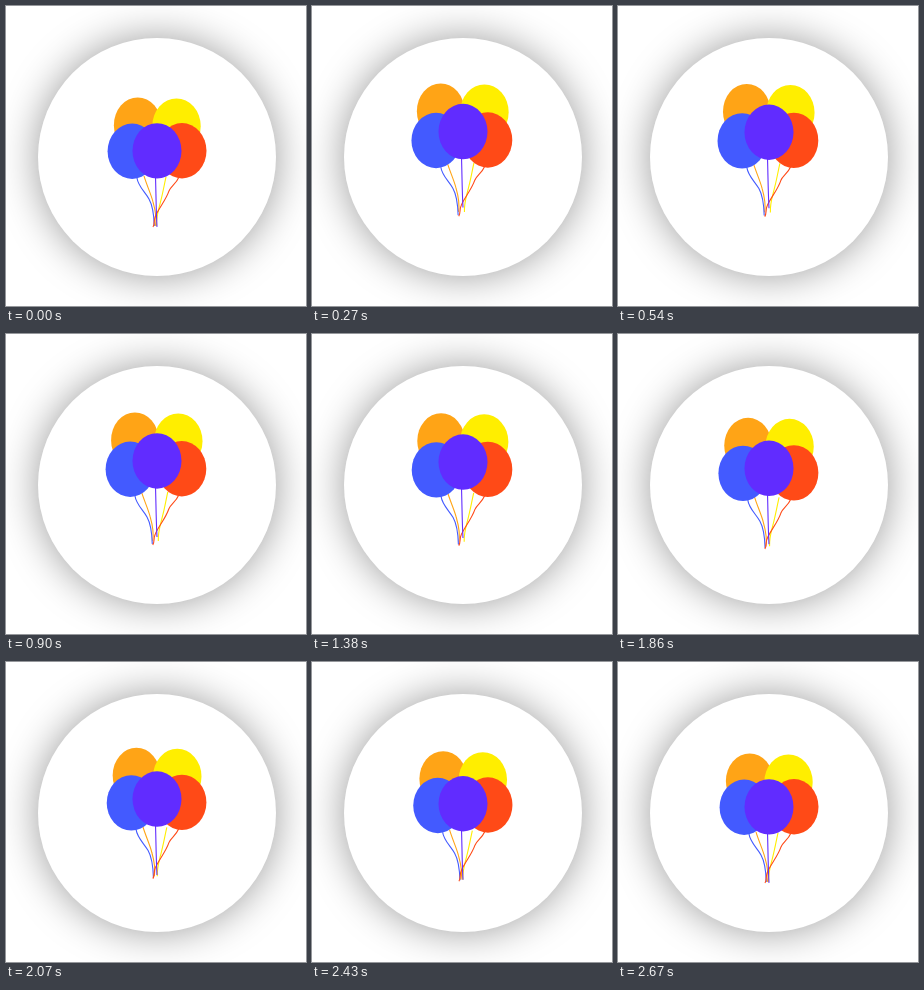
An HTML page that plays this animation: 300 by 300 pixels, repeating every 2.7 s.

```html
<!DOCTYPE html>
<html lang="en">
<head>
<meta charset="utf-8">
<title>Balloons</title>
<style>
  html, body { margin: 0; width: 100%; height: 100%; overflow: hidden; background: #fff; }
  .disc {
    position: absolute; left: 32px; top: 32px; width: 238px; height: 238px;
    border-radius: 50%; background: #fff; box-shadow: 0 0 40px rgba(0, 0, 0, .4);
  }
  svg { position: absolute; left: 0; top: 0; }
  path { fill: none; stroke-width: 1.1; }
</style>
</head>
<body>
<div class="disc"></div>
<svg id="stage" width="300" height="300" viewBox="0 0 300 300"></svg>
<script>
const LOOP = 2700, RISE = 1300, FALL_END = 2680;

// Back to front; (dx, dy) is the offset when fully raised.
const balloons = [
  { color: '#ffa416', x: 131.7, y: 119.2, rx: 23.8, dx: -2.8, dy: -13,
    string: 'M138 170C141 180 145 188 147 196C149 203 151 212 149.5 220' },
  { color: '#ffee00', x: 170.5, y: 120.2, rx: 24.2, dx: 1.8, dy: -13,
    string: 'M160 171C158 180 157 186 155 194C153 203 150 210 150.5 220' },
  { color: '#435aff', x: 126.2, y: 145.3, rx: 24.6, dx: -2, dy: -10,
    string: 'M131 172C132 180 139 186 143 193C147 200 148 210 148.3 220' },
  { color: '#ff4a17', x: 176, y: 144.8, rx: 24.5, dx: -.2, dy: -10,
    string: 'M173 171C170 178 165 180 163 185C160 194 153 202 149.5 210C147.5 214 149 218 147 221' },
  { color: '#612cff', x: 151, y: 145, rx: 24.5, dx: 0, dy: -18,
    string: 'M149.5 171C150 185 150 203 151 221' }
];

const stage = document.getElementById('stage');
stage.innerHTML = balloons.map(b => `<g>
  <path d="${b.string}" stroke="${b.color}"/>
  <ellipse cx="${b.x}" cy="${b.y}" rx="${b.rx}" ry="27.7" fill="${b.color}"/>
</g>`).join('');
const groups = [...stage.children];

const elasticOut = p => p <= 0 ? 0
  : 1 + 2 ** (-10 * p) * Math.sin((p - .075) * 2 * Math.PI / .3);

// Springs up, then sinks back at constant speed.
const lift = t => t < RISE
  ? elasticOut(t / RISE)
  : Math.max(0, (FALL_END - t) / (FALL_END - RISE));

const start = performance.now();
function draw(now) {
  const k = lift(Math.max(0, now - start) % LOOP);
  balloons.forEach((b, i) =>
    groups[i].setAttribute('transform', `translate(${b.dx * k} ${b.dy * k})`));
  requestAnimationFrame(draw);
}
draw(start);
</script>
</body>
</html>
```
